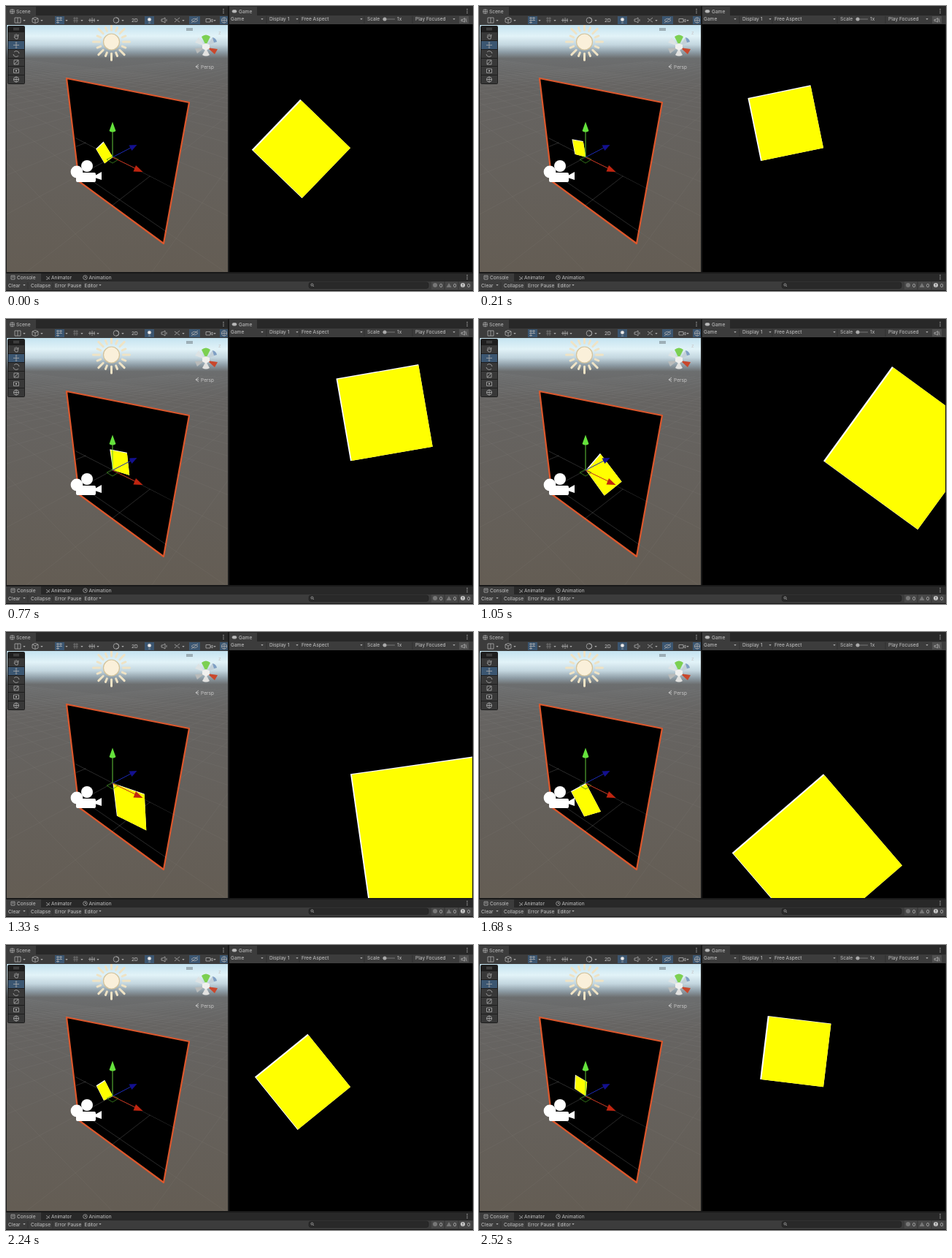
An HTML page for the animation above (2.59 s loop, 640x390 px).

```html
<!DOCTYPE html>
<html lang="en">
<meta charset="utf-8">
<title>Rotating square</title>
<style>
  html, body { margin: 0; width: 100%; height: 100%; overflow: hidden; background: #191919; }
  svg { display: block; width: 640px; height: 390px; }
  text { font: 6.6px Inter, sans-serif; fill: #c8c8c8; white-space: pre; }
  .icon { fill: none; stroke: #adadad; stroke-width: .8; }
</style>
<svg id="stage" viewBox="0 0 640 390">
  <defs>
    <linearGradient id="sky" x1="0" y1="0" x2="0" y2="1">
      <stop offset="0" stop-color="#c4e3f0"/>
      <stop offset=".045" stop-color="#e2f3f8"/>
      <stop offset=".08" stop-color="#c3d6df"/>
      <stop offset=".11" stop-color="#8d9ca5"/>
      <stop offset=".135" stop-color="#6c6e6f"/>
      <stop offset=".25" stop-color="#666462"/>
      <stop offset="1" stop-color="#645d54"/>
    </linearGradient>
    <clipPath id="sceneArea"><path d="M1 26H304V364H1z"/></clipPath>
    <clipPath id="gameArea"><path d="M306 25H639V364H306z"/></clipPath>
    <clipPath id="wall"><path d="M95 179L231 250 216 325 100 240z"/></clipPath>
    <clipPath id="sceneClip"><polygon/></clipPath>
    <clipPath id="gameClip"><polygon/></clipPath>
  </defs>

  <!-- panels -->
  <path fill="#282828" d="M0 0H304V13H0zM306 0H640V13H306zM0 366H640V377H0z"/>
  <path fill="#3c3c3c" d="M0 1H41V13H0zM306 1H344V13H306zM0 13H304V26H0zM306 13H640V25H306zM0 366H48V377H0zM0 377H640V389H0z"/>

  <g clip-path="url(#sceneArea)">
    <path fill="url(#sky)" d="M1 26H304V364H1z"/>
    <path id="ground" fill="none" stroke="#fff" stroke-width=".5" opacity=".07"/>
    <path d="M83 99L251 132 216 325 100 240z" stroke="#dc572c" stroke-width="2.2" stroke-linejoin="round"/>
    <g clip-path="url(#wall)"><path id="wallGrid" fill="none" stroke="#fff" stroke-width=".5" opacity=".32"/></g>
    <polygon id="sceneEdge" fill="#fff"/>
    <g clip-path="url(#sceneClip)"><polygon id="sceneFace" fill="#ff0"/></g>

    <!-- camera -->
    <g fill="#fff">
      <circle cx="97" cy="227" r="8.4"/><circle cx="111" cy="219" r="8"/>
      <rect x="96" y="228" width="27" height="13" rx="2"/>
      <path d="M122 232L131 227V238L122 235z"/>
    </g>

    <!-- move handles -->
    <path d="M138 210L146 206 154 210 146 215z" fill="none" stroke="#3b8a1e" stroke-width=".8"/>
    <path d="M146 207V171" stroke="#62c83a"/>
    <path d="M146 158.500L150.500 171Q146 174 141.500 171z" fill="#65e23c"/>
    <path d="M146 207L171 194" stroke="#1c2ab4"/>
    <path d="M179.500 190L172.500 198 168.500 190.500z" fill="#13108f"/>
    <path d="M146 207L177 222" stroke="#c2301a"/>
    <path d="M187.500 227L174.500 226.500 178 218z" fill="#c02510"/>

    <!-- sun -->
    <g id="sun" stroke="#efe3c5" stroke-width="3" stroke-linecap="round">
      <circle cx="144.500" cy="49" r="11" fill="#faf0da" stroke="#d3c39b" stroke-width="1.2"/>
    </g>

    <!-- orientation cube -->
    <path d="M273 55L259 50 264 43z" fill="#dde3e4"/>
    <path d="M275 55L283 43 289 49z" fill="#c3d0d8"/>
    <path d="M283 43Q288 44 289 49L285 50z" fill="#7f9fc4"/>
    <path d="M274 54L268 42Q274 37 280 42z" fill="#7cd052"/>
    <path d="M272 57L259 58 262 65z" fill="#b9bbba"/>
    <path d="M276 57L290 59 286 66z" fill="#c9472c"/>
    <path d="M274 58L269 67Q274 70 279 67z" fill="#e2e2e0"/>
    <path d="M269 53L274 51 279 53V58L274 61 269 58z" fill="#f0f0ee"/>
    <path d="M264 80L260 83 264 86M264 83H260" fill="none" stroke="#ddd" stroke-width=".7"/>
    <path d="M247 31H256M247 33H256" stroke="#6b757b"/>

    <!-- tools -->
    <rect x="2" y="27" width="24" height="80" rx="2" fill="#1e1e1e"/>
    <path d="M10 30.500H18M10 32.500H18" stroke="#666" stroke-width=".8"/>
    <path fill="#383838" d="M3 36H25V47H3zM3 60H25V71H3zM3 72H25V82H3zM3 83H25V94H3zM3 95H25V106H3z"/>
    <path fill="#3b5671" d="M3 48H25V59H3z"/>
    <path d="M11 42L13 45H16L17 39M12 43V39M14 42V38M16 42V39" class="icon"/>
    <path d="M14 49.500V57.500M10 53.500H18M13 50.500L14 49.500 15 50.500M13 56.500L14 57.500 15 56.500" class="icon"/>
    <path d="M11 63A4 4 0 0 1 18 65M17 68A4 4 0 0 1 10 66" class="icon"/>
    <path d="M11 74H17V80H11zM11 80L17 74" class="icon"/>
    <path d="M10.500 86H17.500V91.500H10.500z" class="icon"/><circle cx="14" cy="88.700" r="1" fill="#ccc"/>
    <circle cx="14" cy="100.500" r="3.500" class="icon"/><path d="M10 100.500H18M14 96.500V104.500" class="icon"/>
  </g>

  <g clip-path="url(#gameArea)">
    <path d="M306 25H640V364H306z"/>
    <polygon id="gameEdge" fill="#fff"/>
    <g clip-path="url(#gameClip)"><polygon id="gameFace" fill="#ff0"/></g>
  </g>

  <!-- toolbar buttons -->
  <path fill="#3b5671" d="M67 14H80V25H67zM190 14H203V25H190zM251 14H266V25H251zM293 14H304V25H293z"/>
  <path fill="#505050" d="M621 14H634V24H621z"/>
  <g class="icon">
    <path d="M12 16H20V23H12zM16 16V23M36 17L40 15.500 44 17V22L40 23.500 36 22zM36 17L40 19 44 17M40 19V23"/>
    <path d="M69 16.500H77M69 19.500H77M69 22.500H73M71 15V24M75 15V20"/>
    <path d="M92 17H99M92 20H99M94 15V23M97 15V23" opacity=".5"/>
    <path d="M113 19.500H122M115 17V22M118 16V23M121 17V22"/>
    <circle cx="151" cy="19.500" r="3.800"/><path d="M151 16A3.500 3.500 0 0 1 151 23"/>
    <circle cx="196.500" cy="18.500" r="2.300" fill="#eee"/><path d="M195 23H198"/>
    <path d="M213 21V18H215L218 16V23L215 21zM220 18V21M231 22L238 16M231 17L234 19M235 20L238 22"/>
    <path d="M254 19.500Q258.500 15 263 19.500 258.500 24 254 19.500zM254 23L263 16"/>
    <path d="M274 17.500H280V22H274zM280 20L283 18V22L280 20"/>
    <circle cx="299" cy="19.500" r="3.600"/><path d="M295 19.500H303M299 15.500V23.500"/>
    <path d="M624 20.500V18.500H626L628.500 16.500V22L626 20.500zM630 17L631 22"/>
    <path d="M6 5H11V10H6zM8.500 4V11M5 7.500H12" stroke-width=".7"/>
    <rect x="310" y="5.500" width="6" height="3.600" rx="1.800" fill="#bbb"/>
    <path d="M7 369H12V374H7zM8 371H11M55 370L60 374M55 374H57L60 370"/>
    <circle cx="108.500" cy="371.500" r="2.800"/><path d="M108.500 370V371.500H110"/>
  </g>
  <path d="M516 18H533" stroke="#777"/><circle cx="519" cy="18" r="2.500" fill="#aaa"/>
  <rect x="415" y="378" width="164" height="8.500" rx="3" fill="#292929" stroke="#1f1f1f" stroke-width=".6"/>
  <circle cx="419.500" cy="381.500" r="1.500" class="icon"/><path d="M420.700 382.700L422 384" class="icon"/>
  <path fill="#474747" d="M583 377H600V388H583zM602 377H619V388H602zM621 377H638V388H621z"/>
  <circle cx="588" cy="382" r="3" fill="#777"/><path d="M607 379L610.500 385H603.500z" fill="#777"/>
  <circle cx="626" cy="382" r="3" fill="#ccc"/><path d="M626 380V382.500M626 383.300V384.200" stroke="#444"/>
  <path d="M30 378V388M64 378V388M105 378V388M357 14V24M402 14V24M491 14V24M557 14V24" stroke="#2c2c2c" stroke-width=".7"/>
</svg>
<script>
const $ = id => document.getElementById(id);
const stage = $('stage');

function add(parent, tag, attrs, content = '') {
  const node = document.createElementNS('http://www.w3.org/2000/svg', tag);
  for (const key in attrs) node.setAttribute(key, attrs[key]);
  node.textContent = content;
  parent.append(node);
}

const labels = [
  ['Scene', 14, 10], ['Game', 319, 10], ['2D', 172, 22], ['Persp', 267, 86], ['z', 291, 39],
  ['Game', 308, 20], ['Display 1', 361, 20], ['Free Aspect', 405, 20], ['Scale', 495, 20],
  ['1x', 536, 20], ['Play Focused', 561, 20],
  ['Console', 15, 374], ['Animator', 62, 374], ['Animation', 113.5, 374],
  ['Clear', 3, 384.5], ['Collapse', 34, 384.5], ['Error Pause', 67, 384.5], ['Editor', 107.5, 384.5],
  ['0', 594, 384.5], ['0', 613, 384.5], ['0', 632, 384.5]
];
for (const [label, x, y] of labels) add(stage, 'text', { x, y }, label);

const arrows = [[25, 19], [49, 19], [83, 19], [104, 19], [126, 19], [160, 19], [243, 19], [286, 19],
  [351, 17], [399, 17], [487, 17], [614, 17], [25, 381], [129, 381]];
for (const [x, y] of arrows) add(stage, 'path', { d: `M${x - 1.7} ${y}h3.400l-1.700 2z`, fill: '#aaa' });

for (const [x, y] of [[298, 7], [632, 7], [632, 371]])
  for (const dy of [-2.5, 0, 2.5]) add(stage, 'circle', { cx: x, cy: y + dy, r: .7, fill: '#bbb' });

for (let i = 0; i < 16; i++) {
  const a = i * Math.PI / 8, far = i % 2 ? 21 : 25;
  const at = r => `${144.5 + r * Math.cos(a)} ${49 + r * Math.sin(a)}`;
  add($('sun'), 'path', { d: `M${at(16)}L${at(far)}` });
}

// Perspective of the floor: p runs along the red axis, q along the blue one.
function floorPoint(p, q) {
  const w = 1 - .216 * p + .2 * q;
  return `${(146.4 + 33.75 * p + 84.6 * q) / w} ${(206.8 - 11.25 * p + 11.6 * q) / w}`;
}
let grid = '';
for (let n = -14; n <= 14; n++) {
  const v = n * 2 / 3;
  grid += `M${floorPoint(v, (-.85 + .216 * v) / .2)}L${floorPoint(v, 24)}`;
  grid += `M${floorPoint(-24, v)}L${floorPoint((.85 + .2 * v) / .216, v)}`;
}
$('ground').setAttribute('d', grid);
$('wallGrid').setAttribute('d', grid);

// Perspective of the upright wall; x and y are game pixels from its centre.
function wallPoint(x, y) {
  const u = x / 350, v = y / 350, w = 1 - .216 * u + .169 * v;
  return [(146.4 + 33.75 * u + 25.75 * v) / w, (206.8 - 11.25 * u + 114.35 * v) / w];
}
const gamePoint = (x, y) => [472 + x, 194.3 + y];

function drawSquare(view, project, corners, edge) {
  const points = (dx, dy) => corners.map(([x, y]) => project(x + dx, y + dy)).join(' ');
  const outline = points(0, 0);
  $(view + 'Edge').setAttribute('points', outline);
  $(view + 'Clip').firstElementChild.setAttribute('points', outline);
  $(view + 'Face').setAttribute('points', points(edge, edge / 2));
}

const LOOP = 2590, STEP = 70;
function draw(now) {
  const time = Math.floor(now % LOOP / STEP) * STEP;
  const turn = (time * .16385 - 46) * Math.PI / 180;
  const c = Math.cos(turn), s = Math.sin(turn);
  const side = 122.2 / (1 + .4 * c);
  const corners = [[0, 0], [-1, 0], [-1, -1], [0, -1]]
    .map(([x, y]) => [side * (x * c - y * s), side * (x * s + y * c)]);
  drawSquare('game', gamePoint, corners, 2);
  drawSquare('scene', wallPoint, corners, 5);
  requestAnimationFrame(() => draw(performance.now()));
}
draw(performance.now());
</script>
</html>
```
